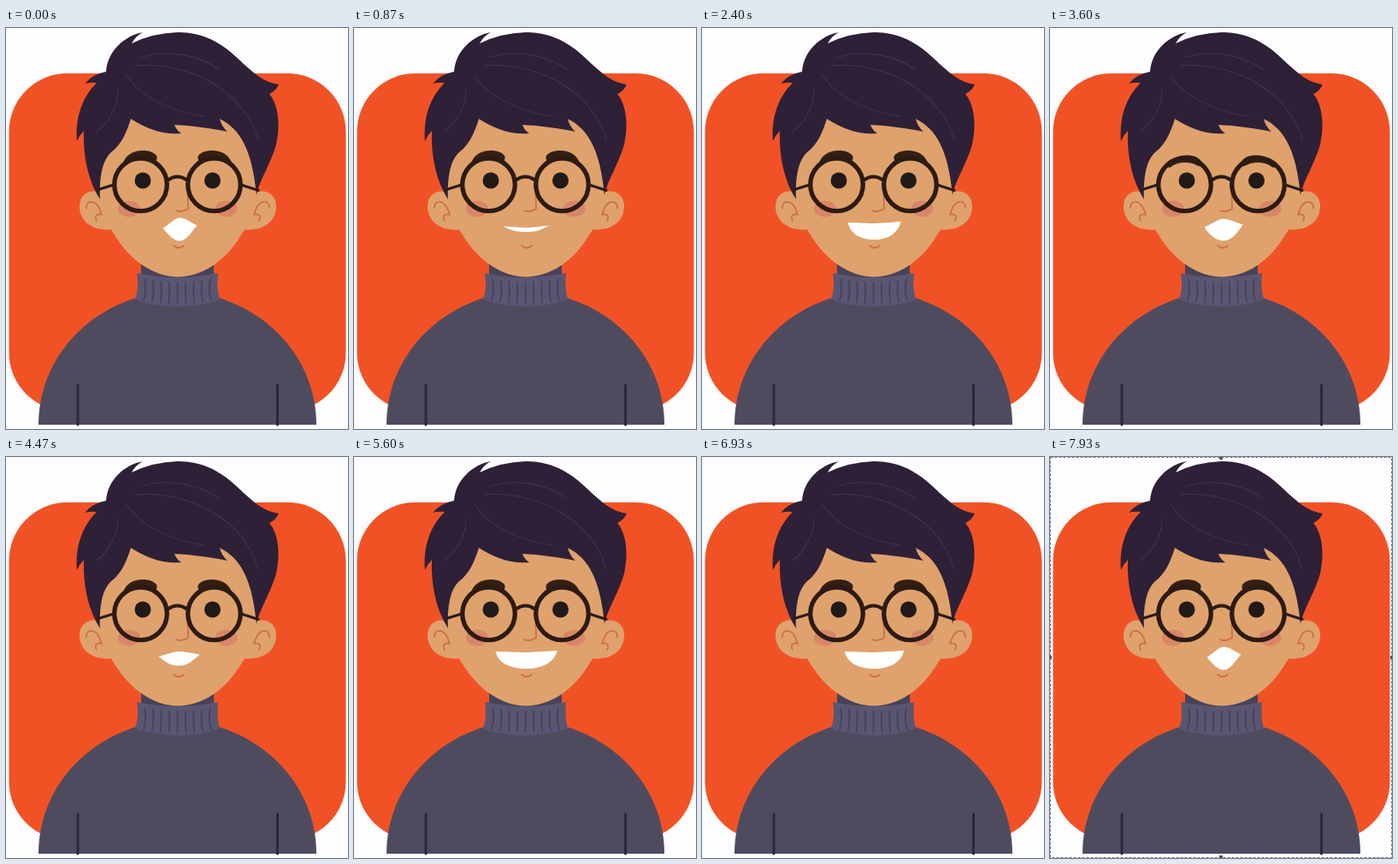
An HTML page that plays this animation: 400x468 px, repeating every 8000 ms.

```html
<!DOCTYPE html>
<html lang="en">
<head>
<meta charset="utf-8">
<title>Talking portrait</title>
<style>
html, body { margin: 0; width: 100%; height: 100%; overflow: hidden; background: #fdfcff; }
svg { display: block; width: 100vw; height: 100vh; }
.line { fill: none; stroke-linecap: round; stroke-linejoin: round; }
</style>
</head>
<body>
<svg viewBox="0 0 400 468">
  <defs>
    <path id="brow" d="M138 155C142 147 150 143 160 143C167 143 173 145 176 149Q178 153 174 156C164 150 150 150 141 157Q137 158 138 155Z"/>
    <path id="ear" d="M113 194C102 186 86 192 86 208C86 224 99 238 126 235Z"/>
    <path id="earLines" d="M94 210C94 201 104 200 109 210L112 218C106 216 103 220 106 225"/>
    <ellipse id="cheek" cx="144" cy="211" rx="13" ry="9.5"/>
  </defs>
  <rect x="3.5" y="53" width="394" height="394" rx="68" fill="#f15225"/>

  <path fill="#4f4b5f" d="M38 463C38 395 84 336 152 315H249C317 336 363 395 363 463Z"/>
  <path class="line" stroke="#2c263c" stroke-width="3" d="M84 417V463M317.500 417V463"/>
  <path fill="#474359" d="M158 272H243V300H158Z"/>
  <path fill="#5a5672" d="M153 286Q200 296 248 286Q246 302 250 317Q200 333 151 317Q156 302 153 286Z"/>
  <g id="ribs" class="line" stroke="#454058" stroke-width="1.600"></g>

  <g fill="#dfa26d">
    <use href="#ear"/>
    <use href="#ear" transform="matrix(-1 0 0 1 402 0)"/>
    <path d="M108 100H294V192C291 217 283 231 276 240C257 273 229 290 201 290.500C173 290 145 272 126 240C116 226 110 212 108 192Z"/>
  </g>
  <g class="line" stroke="#cd7048" stroke-width="1.800">
    <use href="#earLines"/>
    <use href="#earLines" transform="matrix(-1 0 0 1 402 0)"/>
    <path d="M212.500 191L213 211Q206 216 199 213"/>
    <path d="M196 254Q202 259 208 254"/>
  </g>
  <g fill="#d98667">
    <use href="#cheek"/>
    <use href="#cheek" transform="matrix(-1 0 0 1 401.5 0)"/>
  </g>

  <path fill="#2e2036" d="M160 5C139 9 119 26 117 51Q103 53 92 65Q99 63 106 64C88 82 81 106 83 132Q86 125 91 120C90 150 96 178 110 200C109 176 112 155 123 145C135 136 141 122 146 106C163 117 183 125 205 123Q199 119 197 113C218 114 240 117 259 121Q252 115 250 106C274 118 288 142 293 195C296 178 310 158 316 136C321 114 319 90 308 77Q315 74 319 66C303 64 290 53 278 42C258 22 236 5 201 5Q171 6 147 18Q151 10 160 5Z"/>
  <g class="line" stroke="#403049" stroke-width="1.300">
    <path d="M131 73C131 92 119 111 106 121"/>
    <path d="M141 55C158 82 196 98 232 103"/>
    <path d="M152 44C211 38 279 72 295 131"/>
    <path d="M159 34C190 24 225 32 249 48"/>
  </g>

  <g id="brows" fill="#341f12">
    <use href="#brow"/>
    <use href="#brow" transform="matrix(-1 0 0 1 401 0)"/>
  </g>
  <g fill="#221a18"><circle cx="160" cy="178" r="9.500"/><circle cx="241.500" cy="178" r="9.500"/></g>
  <g class="line" stroke="#2c1b14" stroke-width="5.300">
    <circle cx="157.500" cy="182.800" r="30.800"/>
    <circle cx="243.500" cy="182.800" r="30.800"/>
    <path stroke-width="4" d="M190 177Q200.500 170 211 177"/>
    <path stroke-width="3" d="M126 183L108 188.500M275 183L295 189.500"/>
  </g>
  <path id="mouth" fill="#fff"/>

  <g id="selection">
    <rect x=".5" y=".5" width="399" height="467" fill="none" stroke="#77747a" stroke-dasharray="3 2"/>
    <path fill="#555" d="M198 0h4v3h-4zM198 465h4v3h-4zM0 232h2v4h-2zM398 232h2v4h-2z"/>
  </g>
</svg>
<script>
const LOOP = 8000, PHRASE = 4000, SELECT_AT = 7730;
const $ = id => document.getElementById(id);

const mix = (a, b, u) => a + (b - a) * u;
function ramp(t, from, to) {
  const u = Math.min(1, Math.max(0, (t - from) / (to - from)));
  return u * u * (3 - 2 * u);
}

const ROUND = { half: 20, center: 203.5, sideY: 232, tilt: 1.7, top: 221.5, bottom: 248.5, handle: 7.5, inset: 6, drop: 7 };

function smile(half, open) {
  return {
    half, center: 201.5, sideY: mix(231, 226.5, open), tilt: 0.5,
    top: mix(233, 228, open), bottom: mix(238, 247, open),
    handle: half * 0.55, inset: mix(9, 3, open), drop: mix(4, 13, open)
  };
}

// A phrase opens from a round vowel to a thin smile, widens, then rounds again.
function mouthPose(t) {
  const open = ramp(t, 870, 1600);
  const pulse = 33.5 + 2.5 * Math.cos(2 * Math.PI * (t - 1600) / 1600);
  const wide = smile(pulse * mix(0.87, 1, open), open);
  const rounding = 1 - ramp(t, 100, 870) + ramp(t, 2950, 3850);
  const pose = {};
  for (const key in ROUND) pose[key] = mix(wide[key], ROUND[key], rounding);
  return pose;
}

function mouthPath({ half, center: x, sideY, tilt, top, bottom, handle, inset, drop }) {
  const left = x - half, right = x + half;
  const leftY = sideY + tilt, rightY = sideY - tilt;
  const rise = y => mix(y, top, 0.4);
  return `M${left} ${leftY}C${mix(left, x, 0.4)} ${rise(leftY)} ${x - 6} ${top} ${x} ${top}` +
    `C${x + 6} ${top} ${mix(right, x, 0.4)} ${rise(rightY)} ${right} ${rightY}` +
    `C${right - inset} ${rightY + drop} ${x + handle} ${bottom} ${x} ${bottom}` +
    `C${x - handle} ${bottom} ${left + inset} ${leftY + drop} ${left} ${leftY}Z`;
}

for (let i = -4; i <= 4; i++) {
  const rib = document.createElementNS("http://www.w3.org/2000/svg", "path");
  const x = 200.5 + i * 9.6, lift = i * i * 0.2;
  rib.setAttribute("d", `M${x} ${297 - lift}Q${x - i * 0.7} ${309 - lift} ${x + i * 0.3} ${321 - lift}`);
  $("ribs").append(rib);
}

function draw(t) {
  const phase = t % PHRASE;
  const frown = ramp(phase, 3300, 3550) - ramp(phase, 3640, 3880);
  $("mouth").setAttribute("d", mouthPath(mouthPose(phase)));
  $("brows").setAttribute("transform", `translate(0 ${5.5 * frown})`);
  $("selection").setAttribute("visibility", t >= SELECT_AT ? "visible" : "hidden");
}

const start = performance.now();
function tick() {
  draw((performance.now() - start) % LOOP);
  requestAnimationFrame(tick);
}
tick();
</script>
</body>
</html>
```
